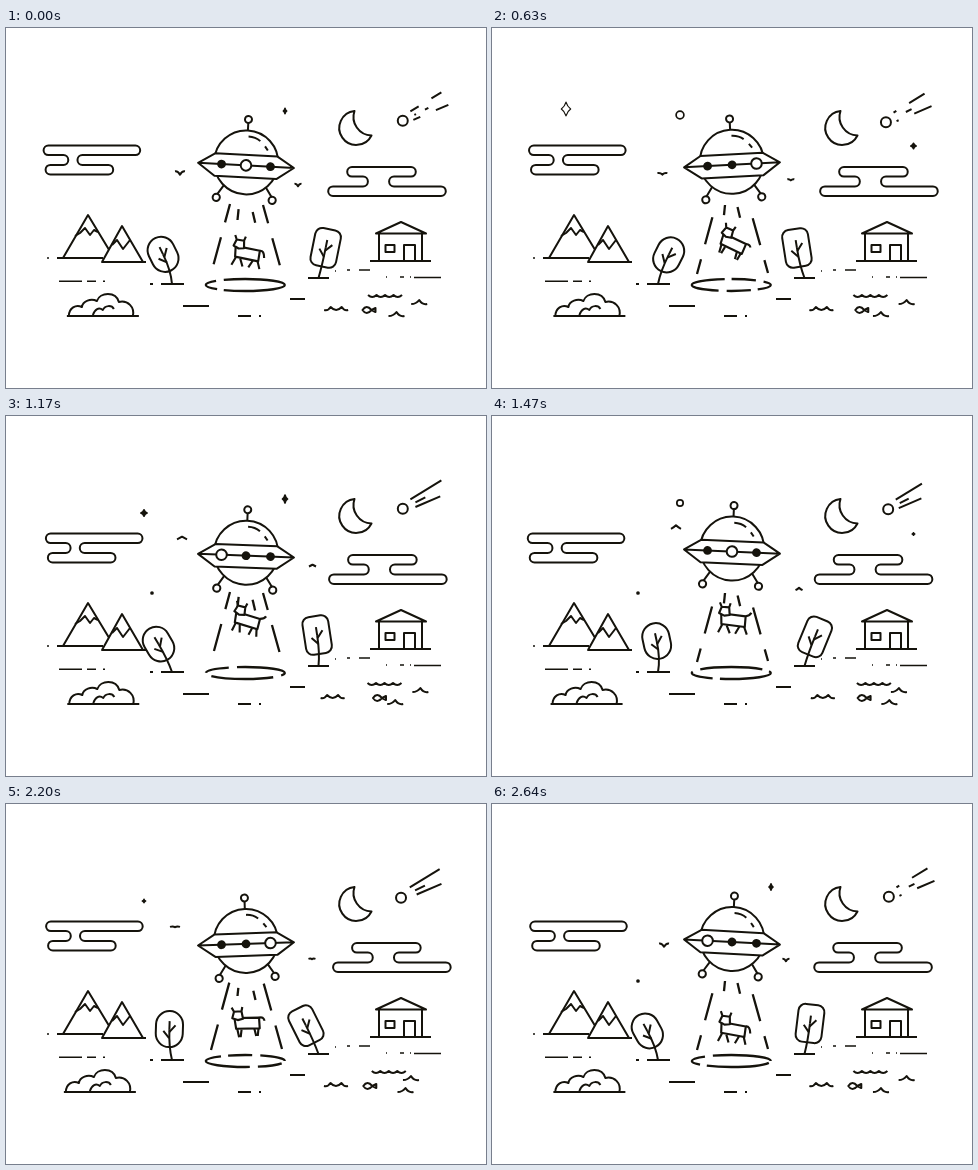
Write an HTML page with a canvas that moves like this. It is 480 px wide and 360 px high and loops after 2.68 s.

```html
<!DOCTYPE html>
<html lang="en">
<head>
<meta charset="utf-8">
<title>UFO</title>
<style>
html, body { margin: 0; width: 100%; height: 100%; overflow: hidden; background: #fff; }
canvas { display: block; }
</style>
</head>
<body>
<canvas id="stage" width="480" height="360"></canvas>
<script>
const ctx = document.getElementById('stage').getContext('2d');
const LOOP = 2680, HALF = LOOP / 2, FLOW = LOOP / 8;
const INK = '#15130c', GOLD = '#e0b010', RAD = Math.PI / 180;

// Cosine wave that peaks at time `peak`
const wave = (t, peak, period = HALF) => Math.cos((t - peak) / period * 2 * Math.PI);

// Grow and shrink around `peak`, once every half loop
function pulse(t, peak, width) {
  const d = Math.abs((t - peak + 2.5 * HALF) % HALF - HALF / 2);
  return d < width ? Math.sqrt(Math.cos(d / width * Math.PI / 2)) : 0;
}

function draw(d, fill) {
  const path = typeof d === 'string' ? new Path2D(d) : d;
  if (fill) { ctx.fillStyle = fill; ctx.fill(path); }
  ctx.stroke(path);
}

function circle(x, y, r, fill = '#fff') {
  const path = new Path2D();
  path.arc(x, y, r, 0, 7);
  draw(path, fill);
}

function at(x, y, angle, body) {
  ctx.save();
  ctx.translate(x, y);
  ctx.rotate(angle * RAD);
  body();
  ctx.restore();
}

function dashed(d, dashes, offset) {
  ctx.setLineDash(dashes);
  ctx.lineDashOffset = offset;
  draw(d);
  ctx.setLineDash([]);
}

// Dashes running along a path: a dash starts at `start` at time `when`
function flowing(d, dash, gap, start, when, t, cycles = 1) {
  dashed(d, [dash, gap], -start - (t - when) / FLOW * cycles * (dash + gap));
}

function scenery() {
  draw('M51 230H97M57 230L82 187L108 230', '#fff');
  draw('M69 208L74 205L79 200L84 207L88 202L92 204');
  draw('M96 234L116 198L137 234H96H140', '#fff');
  draw('M106 217L111 212L117 221L124 212');
  draw('M348.5 83A17 17 0 1 0 365.5 107.5A18.5 18.5 0 0 1 348.5 83Z');
  draw('M370 205.5L395 194L420 205.5ZM373 206V233M416 206V233M364 233H425M379.5 217h9v7h-9ZM398 233V217H409V233');
  draw('M177 278H203M232 288H245M253 288H255M284 271H299M144 256H147M155 256H178M302 250H323');
  ctx.lineWidth = 1.4;
  draw('M41 230H43M53 253.3H76M81 253.3H90M97 253.3H99M329 243H330M341 242H344M353 242H364M380 249H381M394 249H398M404 249H405M408 249.5H435');
  ctx.lineWidth = 2;
}

function clouds(t) {
  at(3.4 - 3.2 * wave(t, HALF / 4), 0, 0, () => draw(
    'M39 117.5H126a4.8 4.8 0 0 1 0 9.6H73a4.8 4.8 0 0 0 0 9.8H99a4.8 4.8 0 0 1 0 9.6H41a4.8 4.8 0 0 1 0-9.6H54a4.8 4.8 0 0 0 0-9.8H39a4.8 4.8 0 0 1 0-9.6Z'));
  at(3 - 3 * wave(t, 0), 0, 0, () => draw(
    'M346 139H405a4.8 4.8 0 0 1 0 9.6H388a4.8 4.8 0 0 0 0 9.8H435a4.8 4.8 0 0 1 0 9.6H327a4.8 4.8 0 0 1 0-9.6H357a4.8 4.8 0 0 0 0-9.8H346a4.8 4.8 0 0 1 0-9.6Z'));
}

function tree(x, y, lean, tilt, w, h, radius) {
  const cx = x + 31 * Math.sin(lean * RAD), cy = y - 31 * Math.cos(lean * RAD);
  const crown = new Path2D();
  crown.roundRect(-w / 2, -h / 2, w, h, radius);
  at(cx, cy, tilt, () => draw(crown, '#fff'));
  const kx = cx - 18 * Math.sin(tilt * RAD), ky = cy + 18 * Math.cos(tilt * RAD);
  draw(`M${x} ${y}Q${kx} ${ky} ${cx} ${cy}`);
  at(cx, cy, tilt, () => draw('M0 0V-8M0 3L6 -4M0 9L-6 2'));
}

function ripples(t) {
  const drift = wave(t, 570, HALF / 2);
  at(95.7 + 2 * drift, 288, 0, () => {
    draw('M-36 0H36M-34 0C-34 -8 -27 -12 -21 -9C-20 -15 -12 -18 -6 -15C-3 -24 13 -25 16 -14C25 -16 32 -9 30 0');
    draw('M-10 -1C-8 -7 -4 -9 0 -6C2 -11 9 -11 11 -7');
  });
  const ripple = (x, y, d) => at(x, y, 0, () => draw(d));
  const crest = 'M-8 1Q-3 1 0 -3Q3 2 8 1';
  ripple(380.5 - 2.5 * drift, 267, 'M-17 0' + 'q4.2 4 8.5 0'.repeat(4));
  ripple(328.5 + 2.5 * wave(t, 90, HALF / 2), 282, 'M-12 0Q-8 1 -5.5 -3Q0 3 5.5 -3Q8 1 12 0');
  ripple(410 + 5.5 * drift, 275, crest);
  ripple(394 - 6 * drift, 287, crest);
  ripple(367.5 - 5.5 * wave(t, 2500, LOOP), 282, 'M3 0Q-2 -6 -6 0Q-2 6 3 0L7 -2V2Z');
}

function comet(t) {
  const swing = wave(t, 1250);
  at(1.5 * swing, -0.7 * swing, 0, () => {
    flowing('M403 84L434 65', 39, 15, 2, 195, t);
    flowing('M407 87.5L421 80.5', 11, 10, 3, 195, t);
    flowing('M406 92.5L441 77.5', 27, 17, 6, 195, t);
    circle(395.4, 93.5, 5);
  });
}

function stars(t) {
  const star = (x, y, size, w, h, fill) => {
    if (!size) return;
    w *= size; h *= size;
    at(x, y, 0, () => draw(`M0 ${-h}Q${w * .25} ${-h * .25} ${w} 0Q${w * .25} ${h * .25} 0 ${h}Q${-w * .25} ${h * .25} ${-w} 0Q${-w * .25} ${-h * .25} 0 ${-h}Z`, fill));
  };
  ctx.lineWidth = 1.7;
  const grow = pulse(t, 435, 300);
  if (grow) at(74, 81, 0, () => {
    ctx.scale(grow, grow);
    draw('M0 -9.5Q2 -3 6.5 0Q2 3 0 9.5Q-2 3 -6.5 0Q-2 -3 0 -9.5Z');
  });
  const ring = pulse(t, 400, 340);
  if (ring) circle(188, 87, 5.6 * ring);
  star(421.5, 118, pulse(t, 435, 330), 3.5, 3.5, INK);
  star(138, 97, pulse(t, 1050, 210), 4, 4, INK);
  star(279, 83, pulse(t, 1150, 260), 2.5, 4, INK);
  if ((t > 800 && t < 1500) || t > 2600) circle(146, 177, 1, INK);
  ctx.lineWidth = 2;
}

// Piecewise path through [time, x, y] points
function follow(points, t) {
  const i = points.findIndex(p => p[0] > t);
  const [t0, x0, y0] = points[i - 1], [t1, x1, y1] = points[i];
  const k = (t - t0) / (t1 - t0);
  return [x0 + (x1 - x0) * k, y0 + (y1 - y0) * k];
}

const LEFT_BIRD = [[0, 174, 145], [370, 173, 160], [870, 168, 133], [1470, 184, 111], [1840, 176, 121], [2200, 169, 123], [2640, 172, 141], [LOOP, 174, 145]];
const RIGHT_BIRD = [[0, 292, 157], [370, 291, 180], [870, 306, 126], [1470, 307, 173], [1840, 315, 157], [2200, 306, 155], [2640, 294, 156], [LOOP, 292, 157]];

function bird(points, t, size) {
  const bend = 3 * wave(t, 150, LOOP);
  at(...follow(points, t), 0, () => {
    ctx.scale(size, size);
    ctx.lineWidth = 2 / size;
    draw(`M-5 ${-bend * .6}Q-2 ${-1 - bend * .4} 0 ${bend * .6}Q2 ${-1 - bend * .4} 5 ${-bend * .6}`);
  });
}

function beam(t) {
  ctx.lineWidth = 2.3;
  flowing('M224 176L205 246', 28, 15.5, 14.5, 130, t, 4);
  flowing('M257 177L276 245', 28, 15.5, 14.5, 130, t, 4);
  flowing('M233 177L231.5 192', 11, 10, 4, 0, t, 2);
  flowing('M245.5 179L249.5 196', 11, 10, 5, 0, t, 2);
  const ring = new Path2D();
  ring.ellipse(239.3, 257, 39.5, 6, 0, 0, 2 * Math.PI);
  dashed(ring, [62, 7, 24, 8], t / HALF * 101);
  ctx.lineWidth = 2;
  ctx.fillStyle = GOLD;
  if (t > 330 && t < 430) ctx.fill(new Path2D('M218 223Q219 228 222 230Q219 232 218 237Q217 232 215 230Q217 228 218 223Z'));
  if (t > 1800 && t < 1900) ctx.fill(new Path2D('M240 176.5a5 3 0 1 0 10 0a5 3 0 1 0 -10 0'));
}

function cow(t) {
  const turn = 9 + 14 * wave(t, LOOP / 4, LOOP);
  at(240.5, 214 + 11 * wave(t, 0, LOOP), turn, () => {
    ctx.scale(1.07, 1.07);
    const kick = 2.5 * wave(t, 100), tail = 5 * wave(t, 0, LOOP);
    draw(`M-9 5L${-10 - kick} 13M-5 6L${-4 + kick} 13M7 6L${6 - kick} 13M11 5L${12 + kick} 13`);
    draw(`M12 -4Q16 -5 17 ${-3 + tail}`);
    draw('M-11 -5L12 -4V6L-10 5Z', '#fff');
    draw('M-13 -5L-11 -11L-4 -11L-3 -4L-8 -3ZM-11 -11L-13 -15M-4 -11L-3 -15', '#fff');
  });
}

function ufo(t) {
  const open = (Math.floor(t / (HALF / 3)) + 1) % 3;
  at(240, 137.4 - 3.2 * wave(t, HALF / 4), 3.1 * wave(t, 0), () => {
    draw('M0 -35V-43M-21 21L-27 30M21 21L27 30');
    circle(0, -46, 3.5);
    circle(-28, 33.5, 3.6);
    circle(28, 33.5, 3.6);
    circle(0, -3, 32);
    draw('M1 -29Q8 -29 13 -25M18 -20L21 -16');
    draw('M-48 0L-31 -10.5H31L48 0L31 12H-31ZM-48 0H48', '#fff');
    [-24.5, 0, 24.5].forEach((x, i) => i === open ? circle(x, 0, 5.3) : circle(x, 0, 3.4, INK));
  });
}

function frame(now) {
  const t = now % LOOP;
  ctx.fillStyle = '#fff';
  ctx.fillRect(0, 0, 480, 360);
  ctx.strokeStyle = INK;
  ctx.lineWidth = 2;
  ctx.lineJoin = 'round';
  scenery();
  clouds(t);
  tree(166, 256, 25.9 * wave(t, 486), 30 * wave(t, 547) - 1, 27, 36, 13.5);
  tree(312.5, 250, 22 * wave(t, 171) - 2, 26 * wave(t, 230) - 1, 26, 38, 7);
  ripples(t);
  comet(t);
  stars(t);
  bird(LEFT_BIRD, t, 1);
  bird(RIGHT_BIRD, t, 0.7);
  beam(t);
  cow(t);
  ufo(t);
  requestAnimationFrame(frame);
}
requestAnimationFrame(frame);
</script>
</body>
</html>
```
